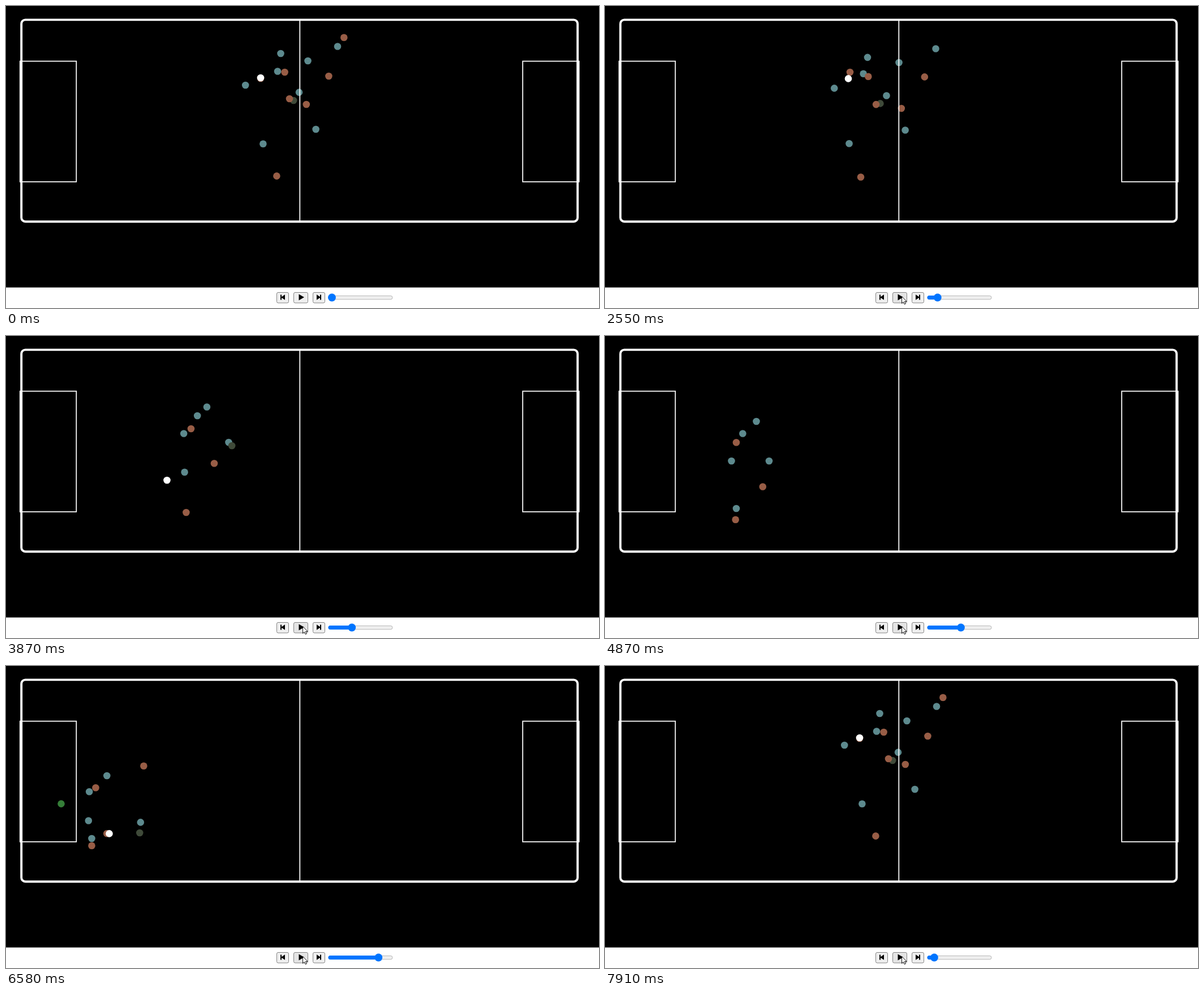
Write an HTML page that moves like this. It is 1048 px wide and 534 px high and loops after 8000 ms.

```html
<!DOCTYPE html>
<html lang="en">
<head>
<meta charset="utf-8">
<title>Match replay</title>
<style>
  html, body { margin: 0; width: 100%; height: 100%; overflow: hidden; background: #fff; }
  svg { display: block; width: 100%; height: 100%; }
  .button { fill: #efefef; stroke: #767676; stroke-width: .9; }
  .pitch { fill: none; stroke: #fff; stroke-width: 1.76; }
</style>
</head>
<body>
<svg viewBox="0 0 1048 534">
  <rect width="1048" height="497.7"/>
  <g id="dots"></g>
  <g class="pitch">
    <rect x="27.2" y="24.4" width="983" height="356.8" rx="7" stroke-width="3.9"/>
    <path d="M519.3 25V381"/>
    <rect x="24.8" y="97.6" width="99.5" height="213.2"/>
    <rect x="913.2" y="97.6" width="99.5" height="213.2"/>
  </g>

  <rect class="button" x="478.5" y="506.5" width="21" height="18.5" rx="2.5"/>
  <rect class="button" id="play" x="508.5" y="506.5" width="25" height="18.5" rx="2.5"/>
  <rect class="button" x="542.5" y="506.5" width="21" height="18.5" rx="2.5"/>
  <path d="M485 510.5h2v3.7l6-4v9.6l-6-4v3.7h-2zM517.5 509.5l9.5 5.5-9.5 5.5zM557 510.5h-2v3.7l-6-4v9.6l6-4v3.7h2z"/>

  <rect x="570" y="512.5" width="113" height="6.2" rx="3.1" fill="#efefef" stroke="#b2b2b2" stroke-width=".9"/>
  <rect id="fill" x="569.5" y="512" height="7" rx="3.5" fill="#0075ff"/>
  <circle id="thumb" cy="515.5" r="6.9" fill="#0075ff"/>
  <path id="cursor" d="M0 0V12.2L2.8 9.6 4.7 13.8 6.8 12.9 4.9 8.8H8.6Z" fill="#fff" stroke="#000" stroke-width=".9"/>
</svg>
<script>
const LOOP = 8000, PLAY = 2520, STEP = 333.5, LAST = 17;
const TEAL = '#5d8a8e', ORANGE = '#985d46', REFEREE = '#3f4a39', KEEPER = '#357e38', BALL = '#fff';
const byId = id => document.getElementById(id);
const mix = (a, b, f) => a.map((v, i) => v + (b[i] - v) * f);
const progress = (t, from, to) => Math.min(1, Math.max(0, (t - from) / (to - from)));

const dots = [];
function addDot(colour, from, until, at) {
  const dot = document.createElementNS('http://www.w3.org/2000/svg', 'circle');
  dot.setAttribute('r', 6.3);
  dot.setAttribute('fill', colour);
  byId('dots').append(dot);
  dots.push({ dot, from, until, at });
}

// Constant velocity per step.
const drift = (colour, from, until, [x, y], [dx, dy]) =>
  addDot(colour, from, until, k => [x + dx * (k - from), y + dy * (k - from)]);

// Gathers pace from kick-off, then runs straight between the key poses and on past the last.
const run = (colour, start, midfield, box, goal) => addDot(colour, 1, LAST, k =>
  k < 6 ? mix(start, midfield, ((k - 1) / 5) ** 1.12) :
  k < 9 ? mix(midfield, box, (k - 6) / 3) :
          mix(box, goal, (k - 9) / 5));

drift(TEAL, 1, 2, [586, 71.5], [-1.5, 4]);
drift(TEAL, 1, 4, [533.5, 97], [-14, 3]);
drift(TEAL, 1, 3, [547.6, 218], [-17, 1.5]);
run(TEAL, [485.5, 84], [355, 125.5], [267.5, 151], [178.3, 194]);
run(TEAL, [480, 115.5], [338.2, 141], [243.4, 172.5], [147.2, 222.3]);
run(TEAL, [423.2, 140], [314.2, 172.5], [223.5, 221], [145.8, 273.5]);
run(TEAL, [518, 152.6], [393.5, 188], [290, 221], [237.8, 276.4]);
run(TEAL, [454.4, 243.7], [315.6, 240.8], [232, 305], [151.5, 305]);

drift(REFEREE, 1, 7, [508.2, 167], [-21.8, 5.4]);
drift(REFEREE, 13, LAST, [246, 290], [-9.7, 5]);
drift(KEEPER, 10, LAST, [99.5, 234], [-.5, 2.4]);

drift(ORANGE, 1, 1, [597.3, 55.8], [0, 0]);
drift(ORANGE, 1, 2, [570.4, 124], [-5.6, 1.4]);
drift(ORANGE, 1, 3, [530.8, 174], [-7, 7]);
drift(ORANGE, 1, 2, [450, 128], [-17, -11]);
run(ORANGE, [492.6, 117], [327, 164], [232, 188.2], [158.5, 215.2]);
run(ORANGE, [501, 164], [368, 225.2], [278.8, 266.5], [178.3, 296.3]);
run(ORANGE, [478.4, 300.6], [318.4, 312], [230.7, 324.8], [151.5, 317.7]);
drift(ORANGE, 14, LAST, [243.4, 176.8], [-11, 9]);

drift(BALL, 1, 2, [450, 127], [-20, 1.4]);
drift(BALL, 3, 7, [365.5, 165], [-27, 30]);
drift(BALL, 14, LAST, [182.5, 296.4], [-35, -14]);

function stepAt(t) {
  if (t < PLAY) return 0;
  const step = 2 + Math.floor((t - PLAY) / STEP);
  return step > LAST ? 1 : step;
}

function cursorAt(t) {
  const arrive = Math.floor(progress(t, 980, 1290) * 4) / 4;
  const landed = mix([562, 531], [515, 508], arrive);
  return mix(landed, [524.5, 513.7], progress(t, 1460, 1700));
}

function draw(t) {
  const step = stepAt(t), shown = Math.max(step, 1);
  for (const { dot, from, until, at } of dots) {
    const [x, y] = at(shown);
    dot.setAttribute('cx', x);
    dot.setAttribute('cy', y);
    dot.style.display = shown >= from && shown <= until ? '' : 'none';
  }

  const thumbX = 576 + 5.88 * step;
  byId('thumb').setAttribute('cx', thumbX);
  byId('fill').setAttribute('width', thumbX - 569.5);

  const pressed = t >= 1990 && t < 2230;
  byId('play').style.fill = pressed ? '#f5f5f5' : t >= 1210 ? '#e5e5e5' : '';
  byId('cursor').style.display = t >= 980 ? '' : 'none';
  byId('cursor').setAttribute('transform', `translate(${cursorAt(t)})`);
}

const start = performance.now();
function tick() {
  draw((performance.now() - start) % LOOP);
  requestAnimationFrame(tick);
}
tick();
</script>
</body>
</html>
```
